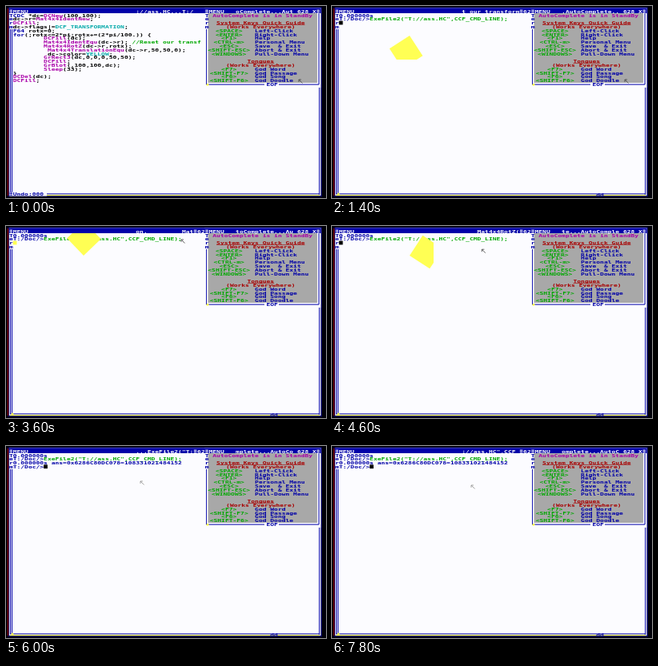
An HTML page with a canvas that plays this animation: 400x240 px, repeating every 8000 ms.

```html
<!DOCTYPE html>
<html>
<head>
<meta charset="utf-8">
<style>
html, body { margin: 0; width: 100%; height: 100%; overflow: hidden; background: #000; }
canvas { display: block; width: 400px; height: 240px; }
</style>
</head>
<body>
<canvas id="stage" width="400" height="240"></canvas>
<script>
const ctx = document.getElementById('stage').getContext('2d');
const LOOP = 8000, STEP = 200, CELL = 4.8;
const RUN_START = 660, RUN_END = 5340;
const BLUE = '#0000a8', WHITE = '#fcfcff', GREEN = '#00a800', RED = '#a80000',
  PURPLE = '#a800a8', CYAN = '#00a8a8', BLACK = '#000', YELLOW = '#ffff54', GREY = '#a8a8a8';

const colX = c => c * CELL - 0.9;
const rowY = r => 6.6 + r * CELL;

function box(x, y, w, h, color) {
  ctx.fillStyle = color;
  ctx.fillRect(x, y, w, h);
}

// Monospaced text on the character grid, drawn with a squat square cell.
function put(s, col, row, color) {
  ctx.save();
  ctx.translate(colX(col), rowY(row) + 2.1);
  ctx.scale(1, 0.74);
  ctx.fillStyle = color;
  for (let i = 0; i < s.length; i++)
    if (s[i] !== ' ') ctx.fillText(s[i], i * CELL, 0);
  ctx.restore();
}

// Parts alternate between text and colour.
function line(row, col, ...parts) {
  for (let i = 0; i < parts.length; i += 2) {
    put(parts[i], col, row, parts[i + 1]);
    col += parts[i].length;
  }
}

function icon(col, row, color) {
  for (let i = 0; i < 3; i++) box(colX(col) + 0.5, rowY(row) - 2 + i * 1.6, 3.6, 0.9, color);
}

function dot(x, y, color) {
  ctx.fillStyle = color;
  ctx.beginPath();
  ctx.arc(x, y, 1.5, 0, Math.PI * 2);
  ctx.fill();
}

function marquee(text, start, col) {
  const n = text.length;
  let s = '';
  for (let i = 0; i < 15; i++) s += text[(((start + i) % n) + n) % n];
  put(s, col, 0, WHITE);
}

function sideTitle(col) {
  [...'Term'].forEach((ch, i) => put(ch, col, i + 1, BLUE));
}

const FILE_TITLE = 'T://ass.HC...';
const CODE_TITLE = 'Mat4x4IdentEqu(dc->r); //Reset our transformation.' + ' '.repeat(9) +
  'Mat4x4RotZ(dc->r,rotx);' + ' '.repeat(10) + 'Mat4x4TranslationEqu(dc->r,50,50,0);';
const COMMAND = 'ExeFile2("T://ass.HC",CCF_CMD_LINE);';
const PROMPT = 'T:/Doc/>';

const CODE = `CDC *dc=DCNew(100,100);
dc->r=Mat4x4IdentNew;
DCFill;
dc->flags|=DCF_TRANSFORMATION;
F64 rotx=0;
for(;rotx<=2*pi;rotx+=(2*pi/100.)) {
        DCFill(dc);
        Mat4x4IdentEqu(dc->r); //Reset our transf
        Mat4x4RotZ(dc->r,rotx);
         Mat4x4TranslationEqu(dc->r,50,50,0);
         dc->color=YELLOW;
        GrRect3(dc,0,0,0,50,50);
        DCFill;
        GrBlot(,100,100,dc);
        Sleep(33);
}
DCDel(dc);
DCFill;`.split('\n');

function tokenColor(s) {
  if (s.startsWith('//')) return GREEN;
  if (/^(CDC|F64|for)$/.test(s)) return BLUE;
  if (/^[A-Z_]{4,}$/.test(s)) return CYAN;
  return /^[A-Z]/.test(s) ? PURPLE : BLACK;
}

function editor() {
  CODE.forEach((text, i) => {
    const tokens = text.match(/\/\/.*|\w+|\W/g);
    line(i + 1, 2, ...tokens.flatMap(s => [s, tokenColor(s)]));
  });
}

function block(col, row, color) {
  box(colX(col), rowY(row) - 2.4, CELL, CELL, color);
}

function terminal(t) {
  put('0.000000s', 2, 1, BLUE);
  line(2, 2, PROMPT, BLUE, COMMAND, GREEN);
  if (t < RUN_END) {
    block(2, 3, (t / STEP) % 2 ? BLACK : YELLOW);
    return;
  }
  put('0.000000s ans=0x6286C80DC078=108331021484152', 2, 3, BLUE);
  put(PROMPT, 2, 4, BLUE);
  block(10, 4, BLACK);
}

// A 30px square turning once about its corner, clipped to its 60px drawing area.
function spinner(t) {
  ctx.save();
  ctx.beginPath();
  ctx.rect(67, 9, 60, 58);
  ctx.clip();
  ctx.translate(97, 37);
  ctx.rotate(2 * Math.PI * (t - RUN_START) / (RUN_END - RUN_START));
  box(0, 0, 30, 30, YELLOW);
  ctx.restore();
}

function mainWindow(t, shift) {
  const editing = t < RUN_START, running = !editing && t < RUN_END;
  box(4, 2.5, 389.5, 234.5, WHITE);
  box(4, 2.5, 389.5, 6.5, BLUE);
  box(5, 29, 1, 206, BLUE);
  box(7, 29, 1, 205, BLUE);
  box(391.2, 9, 1, 227, BLUE);
  box(5, 234.4, 387, 1, BLUE);
  sideTitle(1);
  if (editing) editor(); else terminal(t);
  if (running) spinner(t);

  icon(1, 0, WHITE);
  put('MENU', 2, 0, WHITE);
  if (editing) marquee(FILE_TITLE, shift - 2, 34);
  else if (running) marquee(CODE_TITLE, shift + 15, 34);
  else marquee(COMMAND + ';....', shift - 13, 34);

  box(5, 236, 387, 1.2, YELLOW);
  if (editing) {
    box(4, 232.5, 47, 5, WHITE);
    icon(1, 47.5, BLUE);
    put('Undo:000', 2, 47.5, BLUE);
  } else {
    icon(49, 0, WHITE);
    put('62', 50, 0, WHITE);
    dot(8, 235, YELLOW);
    put('dd', 69, 47.7, BLUE);
  }
}

const KEYS = [
  [5, '<SPACE>', 'Left-Click'], [6, '<ENTER>', 'Right-Click'], [7, '<F1>', 'Help'],
  [8, '<CTRL-m>', 'Personal Menu'], [9, '<ESC>', 'Save  & Exit'],
  [10, '<SHIFT-ESC>', 'Abort & Exit'], [11, '<WINDOWS>', 'Pull-Down Menu'],
  [15, '<F7>', 'God Word'], [16, '<SHIFT-F7>', 'God Passage'],
  [17, '<F6>', 'God Song'], [18, '<SHIFT-F6>', 'God Doodle']
];

function heading(s, col, row) {
  put(s, col, row, RED);
  box(colX(col), rowY(row) + 2.2, s.length * CELL, 0.6, RED);
}

function helpWindow(shift) {
  const left = colX(52);
  box(left - 0.7, 2.5, 394 - left, 99.5, WHITE);
  box(left - 0.7, 2.5, 394 - left, 6.5, BLUE);
  box(252.5, 9, 136.5, 87, GREY);
  box(left + 1.4, 29, 0.9, 69, BLUE);
  box(390.6, 9, 1, 89, BLUE);
  box(left + 1.4, 97.6, 141, 1, BLUE);
  sideTitle(52);
  icon(52, 0, WHITE);
  put('MENU', 53, 0, WHITE);
  marquee('AutoComplete...', shift, 60);
  put('628', 76, 0, WHITE);
  put('X', 80, 0, WHITE);
  icon(81, 0, WHITE);

  put('AutoComplete is in StandBy', 54, 1, PURPLE);
  heading('System Keys Quick Guide', 55, 3);
  heading('Tongues', 63, 13);
  for (const row of [4, 14]) put('(Works Everywhere)', 57.5, row, RED);
  for (const [row, key, label] of KEYS) {
    put(key, 53 + (10.5 - key.length) / 2, row, GREEN);
    put(label, 65, row, BLUE);
  }
  box(323, 95.8, 18, 5, WHITE);
  put('EOF', 68, 19, BLUE);
  dot(252, 98.2, YELLOW);
}

const PATH = [[1400, 366, 92], [2400, 336, 34], [3600, 219, 17], [5400, 162, 39], [6600, 174, 49]];

function pointer(t) {
  let [, x, y] = PATH[0];
  for (let i = 1; i < PATH.length; i++) {
    const [t0, x0, y0] = PATH[i - 1], [t1, x1, y1] = PATH[i];
    if (t < t0) break;
    const k = Math.min(1, (t - t0) / (t1 - t0));
    x = x0 + (x1 - x0) * k;
    y = y0 + (y1 - y0) * k;
  }
  ctx.strokeStyle = t < RUN_END ? '#404040' : t < 6000 ? '#a8a830' : '#909090';
  ctx.lineWidth = 0.8;
  ctx.beginPath();
  ctx.moveTo(x + 4.5, y + 4.5);
  ctx.lineTo(x, y);
  ctx.lineTo(x + 3, y);
  ctx.moveTo(x, y);
  ctx.lineTo(x, y + 3);
  ctx.stroke();
}

function draw(now) {
  const t = Math.floor((now % LOOP) / STEP) * STEP;
  const shift = Math.floor(3.3 + 7.98 * t / 1000);
  ctx.font = 'bold 8px "DejaVu Sans Mono", monospace';
  box(0, 0, 400, 240, '#000008');
  box(2.5, 1.5, 392.5, 237, '#000060');
  box(2, 3, 1, 234, RED);
  mainWindow(t, shift);
  helpWindow(shift);
  pointer(t);
}

const start = performance.now();
function tick() {
  draw(performance.now() - start);
  requestAnimationFrame(tick);
}
tick();
</script>
</body>
</html>
```
